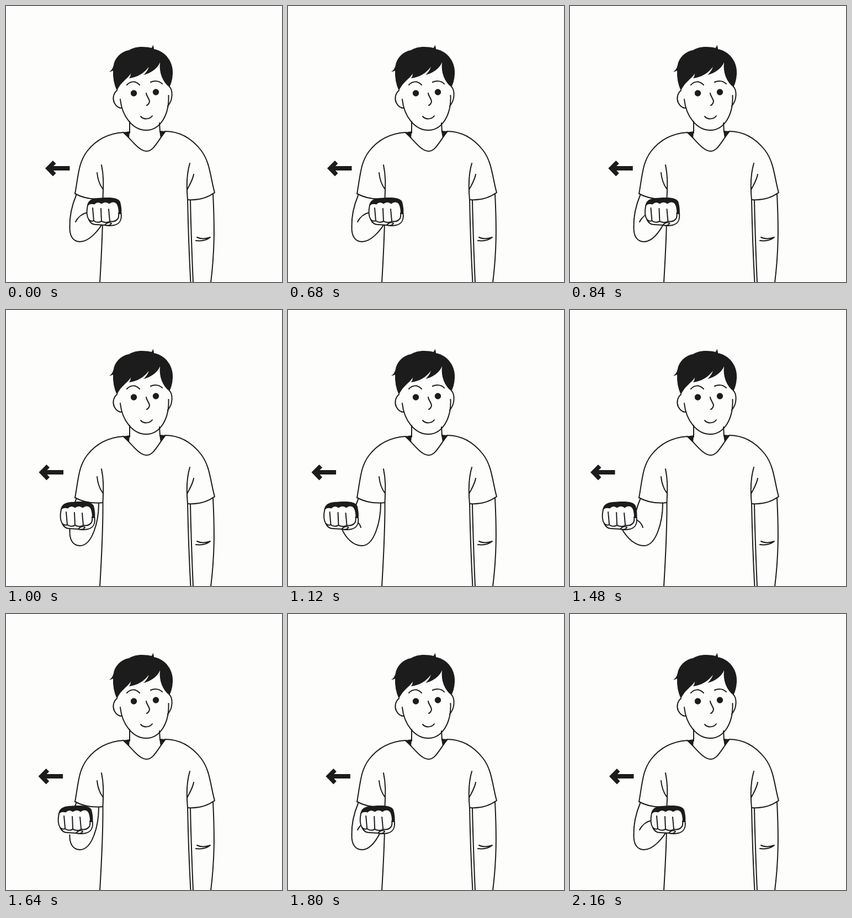
Animation, 500 px wide and 500 px high, one loop 3 s. Source, as an HTML page:

```html
<!DOCTYPE html>
<html>
<head>
<meta charset="utf-8">
<style>
  html, body { margin: 0; width: 100%; height: 100%; overflow: hidden; background: #fdfdfc; }
  svg { display: block; width: 100vw; height: 100vh; }
  path { fill: none; stroke: #1c1c1c; stroke-width: 2; stroke-linecap: round; stroke-linejoin: round; }
  .ink { fill: #1c1c1c; stroke: none; }
  .skin { fill: #fdfdfc; }
</style>
</head>
<body>
<svg viewBox="0 0 500 500">
  <!-- shirt and right arm -->
  <path d="M213 229C181 231 161 245 147 263C131 284 131 308 125 340"/>
  <path d="M288 227C318 227 338 242 353 261C370 283 370 310 378 338Q357 353 330 351"/>
  <path d="M173 288C178 312 176 330 175.500 349C176 400 173 450 170 501M165 302C166 313 170 324 175 331"/>
  <path d="M333 285C327 305 327 330 329 351C330 400 332 455 334.500 501M334 352C335 400 337 455 339 501M340 305C338 316 332 325 328 333"/>
  <path d="M375 340C378 400 378 445 371 501M346 419Q356 424 370 419Q360 427 344 425"/>
  <!-- neck and collar -->
  <path d="M224 209V230M278 212L279 228M213 229C228 243 241 263 255 263C267 263 274 246 288 228"/>
  <path class="ink" d="M211 229L224 227L223 240ZM278 226L290 227L280 240Z"/>
  <!-- face -->
  <path d="M207 169C210 200 230 225 254 225C280 225 296 196 294.500 162"/>
  <path d="M201 153C194 159 193 168 196 175Q201 185 210 185M296 146C303 153 302 172 293 181"/>
  <path d="M219 143C225 136 234 135 242 143M262 138C268 135 277 135 283 141"/>
  <path d="M254 158C255 165 260 168 260 173Q259 178 255 180M244 200C249 206 260 206 265 199"/>
  <circle class="ink" cx="231.500" cy="158" r="5.700"/>
  <circle class="ink" cx="271.500" cy="156" r="5.700"/>
  <path class="ink" d="M187 119Q193 116 195 107C198 92 210 82 223 80C234 73 251 73 263 76Q266 74 266 70Q268 74 268 78C290 82 304 103 302 124Q301 138 296 147C283 137 277 120 279 102C275 113 262 122 249 125Q256 119 259 110C250 122 238 129 223 131Q226 127 226 122C222 131 207 138 201 154Q193 136 194 117Q191 119 187 119Z"/>
  <!-- moving arm -->
  <path id="inner"/>
  <path id="outer"/>
  <path id="under"/>
  <path id="crease"/>
  <path d="M125 340Q147 352 175 349" stroke-width="2.500"/>
  <g id="hand">
    <path class="skin" d="M148 361C146 370 146 381 150 387Q154 396 163 396L180 397Q188 399 196 397C206 395 210 387 208.500 376L204 354L180 349L153 354Z"/>
    <path d="M150 387Q154 391 159 389Q165 394 173 390Q181 394 188 390Q197 392 202 386Q205 383 204 375M157 366L159 389M172 367L173 390M186 368L188 390"/>
    <path class="skin" d="M179 397C182 392 188 391 191 394Q188 399 179 397Z"/>
    <path class="ink" d="M147 363C148 352 155 348 172 347.500C193 346 204 348 207 355C209 363 210 370 209 377H204C204 369 203 362 200 358Q194 353 187 358.500Q180 353 173 358.500Q166 353 160 359.500Q152 357 147 363Z"/>
  </g>
  <path id="arrow" class="ink" d="M71 294L85 280L90.500 285.500L86 290H115.500V298H86L90.500 303L85 308.500Z"/>
</svg>
<script>
  const el = id => document.getElementById(id);
  const clamp = v => Math.min(1, Math.max(0, v));
  const span = (t, a, b) => clamp((t - a) / (b - a));
  const quad = p => p < .5 ? 2 * p * p : 1 - 2 * (1 - p) ** 2;
  const mix = (a, b, p) => a.map((v, i) => v + (b[i] - v) * p);
  const slide = (id, x) => el(id).setAttribute('transform', `translate(${x})`);
  const draw = (id, d) => el(id).setAttribute('d', d);

  function render(t) {
    const reach = Math.min(quad(span(t, 700, 1325)), 1 - quad(span(t, 1285, 1998)));
    const push = Math.min(span(t, 660, 1220) ** 3, (1 - span(t, 1400, 2040)) ** 3);
    slide('hand', -103.5 * reach);
    slide('arrow', -51 * push);

    // the forearm first swings up to the sleeve, then out to the side
    const lift = clamp(reach / .45), swing = span(reach, .5, 1);
    const [x, y, ...c] = mix([180, 385, 168, 408, 150, 427], [168, 350, 168, 384, 156, 427], lift);
    draw('inner', `M${x} ${y}C${c} 134 427`);
    draw('under', `M134 427C${mix([121, 427, 115, 416, 115.5, 400], [118, 427, 99, 414, 84, 394], swing)}`);
    draw('outer', 'M127 343C120 360 ' + (swing ? '118 370 117 379' : '115 380 115.5 400'));
    draw('crease', swing ? 'M102 375C118 376 129 383 132 394' : 'M126 391C130 383 138 376 148 374');
  }

  function tick() {
    render(performance.now() % 3000);
    requestAnimationFrame(tick);
  }
  tick();
</script>
</body>
</html>
```
